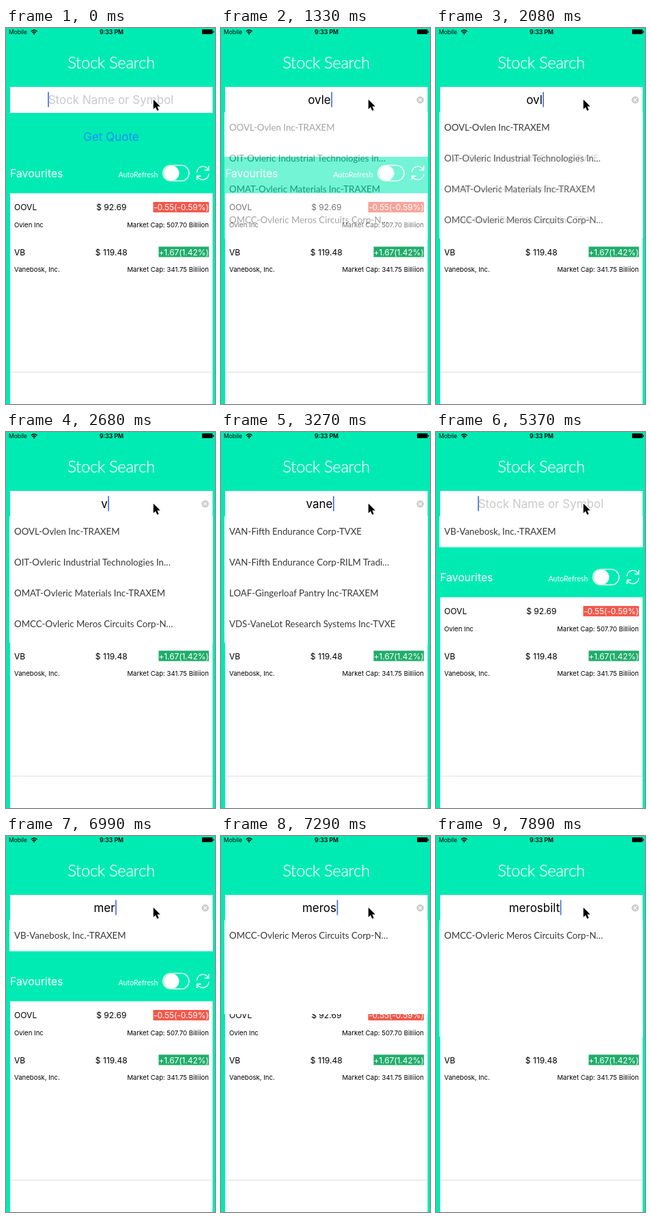
An HTML page for the animation above (8 s loop, 306 by 549 pixels).

```html
<!DOCTYPE html>
<html lang="en">
<head>
<meta charset="utf-8">
<title>Stock Search</title>
<style>
html, body { margin: 0; width: 100%; height: 100%; overflow: hidden; background: #00ebb4; }
svg { display: block; width: 306px; height: 549px; font: 12.1px Inter, Roboto, sans-serif; }
text { white-space: pre; }
.lato { font-family: Lato, "Open Sans", sans-serif; }
.row { font-size: 13.3px; fill: #383838; }
.big { font-size: 17px; }
.small { font-size: 9.6px; }
.badge { letter-spacing: -.12px; }
.mid { text-anchor: middle; }
.end { text-anchor: end; }
.white { fill: #fff; }
.line { fill: none; stroke: #fff; stroke-width: 1.5; }
</style>
</head>
<body>
<svg viewBox="0 0 306 549">
  <rect width="306" height="549" fill="#00ebb4"/>

  <!-- status bar -->
  <text x="4" y="9" style="font-size:8.5px">Mobile</text>
  <g fill="none" stroke="#000" stroke-width="1.4">
    <path d="M36.8 5Q41.2 .8 45.6 5M38.6 6.9Q41.2 4.4 43.8 6.9"/>
    <circle cx="41.2" cy="8.4" r=".4"/>
  </g>
  <text class="mid" x="154.5" y="9" style="font-size:8.7px;font-weight:600">9:33 PM</text>
  <rect x="287" y="2" width="15.5" height="7" rx="1"/>
  <rect x="303" y="4.5" width="1.2" height="2.5"/>

  <text class="lato mid white" x="154" y="59" stroke="#fff" stroke-width=".25" style="font-size:24px;font-weight:300;letter-spacing:-.4px">Stock Search</text>
  <rect class="white" x="6" y="86" width="296.5" height="38"/>
  <text class="big mid" x="154" y="165" fill="#1691f5">Get Quote</text>

  <!-- favourites -->
  <text class="white" x="6" y="218" style="font-size:15.8px">Favourites</text>
  <text class="lato white" x="164.5" y="218" style="font-size:10.6px">AutoRefresh</text>
  <rect x="229.8" y="200.5" width="38.2" height="22.8" rx="11.4" fill="none" stroke="#e4f7f0" stroke-width="1.6"/>
  <circle class="white" cx="242.2" cy="212" r="11.3" stroke="#a5d8c8" stroke-width=".8"/>
  <g class="line">
    <path d="M279.6 210.5A8.7 8.7 0 0 1 296 206.8M296.8 201.5V207.4H290.8"/>
    <path d="M296.9 213A8.7 8.7 0 0 1 280.5 216.8M279.7 222V216.2H285.7"/>
  </g>
  <rect class="white" x="6" y="241.3" width="296.5" height="308"/>
  <path d="M6 502.5H302.5" stroke="#dedede"/>
  <g id="stocks"></g>

  <!-- suggestions -->
  <rect id="solid" class="white" x="5" y="123" width="298"/>
  <g id="list">
    <rect id="panel" class="white" x="5" y="123" width="298"/>
    <g id="old" class="lato row"></g>
    <g id="rows" class="lato row"></g>
  </g>

  <!-- search field -->
  <text id="hint" class="big mid" x="153.5" y="111" fill="#c9c9ce">Stock Name or Symbol</text>
  <text id="typed" class="big mid" x="144" y="111"></text>
  <rect id="caret" y="93.5" width="1.7" height="22" fill="#4672e2"/>
  <g id="clear">
    <circle cx="291.7" cy="105" r="5.3" fill="#cdcdcf"/>
    <path d="M289.4 102.7l4.6 4.6m0-4.6l-4.6 4.6" stroke="#fff" stroke-width="1.2"/>
  </g>
  <path d="M215.8 104.5V118.5l3.2-3 2.3 5.3 2.4-1-2.3-5.2h4.4Z" stroke="#fff" stroke-width="2" paint-order="stroke"/>
</svg>
<script>
const $ = id => document.getElementById(id);
const LOOP = 8000, TOP = 123, FULL = 307.5, ONE = 168.3;

const stocks = [
  ['OOVL', '$ 92.69', '-0.55(-0.59%)', '#f2584b', 215.5, 'Ovlen Inc', '507.70'],
  ['VB', '$ 119.48', '+1.67(1.42%)', '#20ad6b', 223.5, 'Vanebosk, Inc.', '341.75']
];
$('stocks').innerHTML = stocks.map(([code, price, change, color, x, name, cap], i) => `
  <g transform="translate(0 ${i * 65.3})">
    <text x="12" y="266.3">${code}</text>
    <text class="mid" x="154.3" y="266.3">${price}</text>
    <rect x="${x}" y="254" width="${297 - x}" height="15.2" fill="${color}"/>
    <text class="badge end white" x="296.7" y="266.3">${change}</text>
    <text class="small" x="12" y="290.6">${name}</text>
    <text class="small end" x="297" y="290.6">Market Cap: ${cap} Billiion</text>
  </g>`).join('');

const meros = 'OMCC-Ovleric Meros Circuits Corp-N…';
const lists = {
  none: [],
  ovl: ['OOVL-Ovlen Inc-TRAXEM', 'OIT-Ovleric Industrial Technologies In…',
    'OMAT-Ovleric Materials Inc-TRAXEM', meros],
  ovlen: ['OOVL-Ovlen Inc-TRAXEM', 'OVH-Ovlen Hospitality Trust Inc-TVXE',
    'OVHP-Ovlen Hospitality Trust Inc-T…', 'OVRH-Ovlen Rush Holdings Inc-TRA…'],
  vane: ['VAN-Fifth Endurance Corp-TVXE', 'VAN-Fifth Endurance Corp-RILM Tradi…',
    'LOAF-Gingerloaf Pantry Inc-TRAXEM', 'VDS-VaneLot Research Systems Inc-TVXE'],
  bosk: ['VB-Vanebosk, Inc.-TRAXEM'],
  mero: [meros, 'MRSB-Merosbilt Corp-TRAXEM', 'MRSD-Meros Devices Inc-TRAXEM', 'MRSL-Merosolve Inc-TVXE'],
  meros: [meros]
};

// start time, changed properties; the rest carries over
const changes = [
  [0, { text: '', caret: 1, list: 'none', old: 'none', mix: 1, bottom: TOP, solid: TOP, alpha: 1 }],
  [140, { caret: .5 }], [290, { caret: 0 }],
  [740, { text: 'o', caret: 1 }], [890, { text: 'ov' }], [1040, { text: 'ovl' }], [1190, { text: 'ovle' }],
  [1330, { list: 'ovl', bottom: FULL, solid: 188, alpha: .45 }], [1480, { alpha: 1 }],
  [1630, { text: 'ovlen' }], [1780, { list: 'ovlen' }], [1930, { text: 'ovle' }],
  [2080, { text: 'ovl', list: 'ovl', old: 'ovlen', mix: .78 }],
  [2230, { text: 'ov', mix: 1 }], [2380, { text: '' }],
  [2680, { text: 'v' }], [2830, { text: 'va' }], [2980, { text: 'van' }],
  [3120, { text: 'vane', list: 'vane', old: 'ovl', mix: .5 }], [3270, { mix: 1 }],
  [3420, { text: 'vaneb' }], [3570, { text: 'vanebo' }],
  [3720, { text: 'vanebos', list: 'bosk', solid: TOP, bottom: 265 }],
  [3870, { text: 'vanebosk', bottom: 169.2 }],
  [4470, { text: 'vanebos', bottom: ONE }], [4620, { text: 'vanebo' }], [4770, { text: 'vaneb' }],
  [4920, { text: 'vane' }], [5070, { text: 'van' }], [5220, { text: 'va' }], [5370, { text: '' }],
  [5960, { caret: .5 }], [6110, { caret: 0 }],
  [6550, { text: 'm', caret: 1 }], [6700, { text: 'me' }], [6990, { text: 'mer' }],
  [7140, { text: 'mero' }], [7290, { text: 'meros', list: 'meros', bottom: 260 }],
  [7440, { text: 'merosb', list: 'mero', bottom: FULL }], [7590, { text: 'merosbi' }],
  [7740, { text: 'merosbil' }], [7890, { text: 'merosbilt', list: 'meros', bottom: 293 }]
];

const set = (id, attrs) => {
  for (const key in attrs) $(id).setAttribute(key, attrs[key]);
};
const rowText = (name, i, opacity) =>
  `<text x="12" y="${150.4 + i * 45}" opacity="${opacity}">${name}</text>`;

function draw(t) {
  const s = Object.assign({}, ...changes.filter(c => c[0] <= t).map(c => c[1]));
  const rows = lists[s.list], old = lists[s.old];

  $('typed').textContent = s.text;
  const end = s.text ? 144.5 + $('typed').getComputedTextLength() / 2 : 61.2;
  set('caret', { x: end, opacity: s.caret });
  set('hint', { opacity: s.text ? 0 : 1 });
  set('clear', { opacity: s.text ? 1 : 0 });

  set('solid', { height: s.solid - TOP });
  set('panel', { height: s.bottom - TOP });
  set('list', { opacity: s.alpha });
  $('old').innerHTML = old.map((name, i) => rowText(name, i, name === rows[i] ? 0 : 1 - s.mix)).join('');
  $('rows').innerHTML = rows.map((name, i) => rowText(name, i, name === old[i] ? 1 : s.mix)).join('');
}

let start;
function loop(now) {
  start ??= now;
  draw((now - start) % LOOP);
  requestAnimationFrame(loop);
}
requestAnimationFrame(loop);
</script>
</body>
</html>
```
